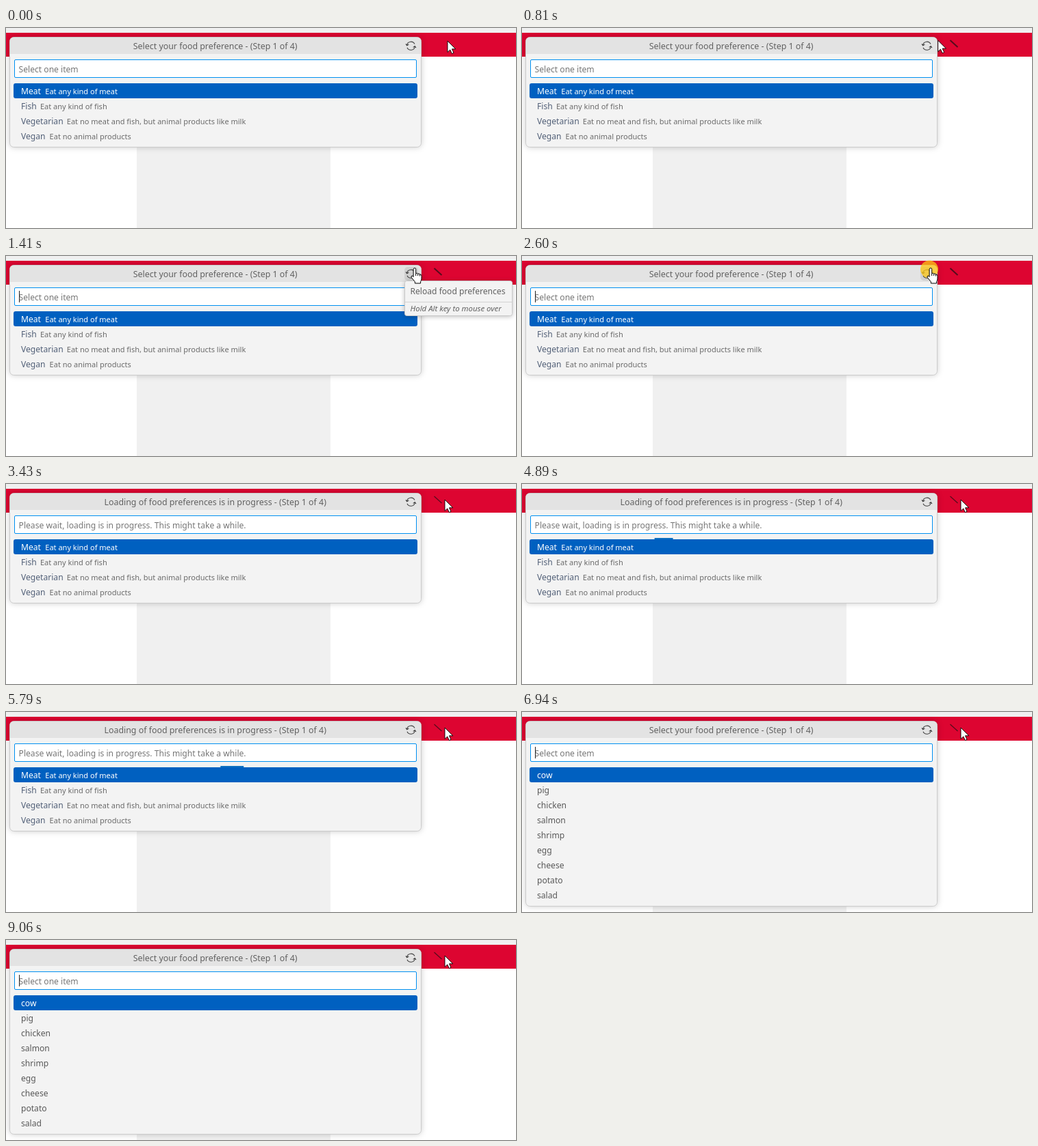
These frames come from a looping animation (745 by 293 pixels, 9130 ms). An HTML page:

```html
<!DOCTYPE html>
<html lang="en">
<head>
<meta charset="utf-8">
<title>Quick pick</title>
<style>
html, body { margin: 0; width: 100%; height: 100%; overflow: hidden; background: #fff; }
svg { display: block; font: 12.1px "Noto Sans", "Open Sans", sans-serif; fill: #616161; }
#panel { filter: drop-shadow(0 0 4px rgba(0, 0, 0, .2)); }
#tip { filter: drop-shadow(0 1px 3px rgba(0, 0, 0, .25)); }
.desc { font-size: 11px; fill: #6a6a6a; }
.first, .first .desc { fill: #fff; }
.cursor { fill: #fff; stroke: #000; stroke-linejoin: round; }
</style>
</head>
<body>
<svg width="745" height="293" viewBox="0 0 745 293">
  <rect width="745" height="7" fill="#f0f0f0"/>
  <rect y="7" width="745" height="35" fill="#dd0531"/>
  <rect x="191" y="141" width="283" height="283" fill="#f0f0f0"/>
  <path id="streak" d="M625.5 18L636.5 28" stroke="#560c1c"/>

  <rect id="panel" x="5.5" y="13.5" width="601" rx="6" fill="#f3f3f3" stroke="#cbcbcb"/>
  <path d="M6 38V19q0-5 5-5H601q5 0 5 5V38z" fill="#e3e3e3"/>
  <text id="title" x="305.7" y="31" text-anchor="middle" font-size="12.38"></text>
  <rect id="hover" x="582" y="16" width="20" height="20" rx="5" fill="#b8b8b8" fill-opacity=".45"/>
  <g fill="none" stroke="#424242" stroke-width="1.1">
    <path id="turn" d="M585.6 25.4A6 6 0 0 1 597 23.6M584 23.4L585.7 25.8L588.3 24"/>
    <use href="#turn" transform="rotate(180 591.5 26.2)"/>
  </g>
  <rect x="12.5" y="46.5" width="587" height="26" rx="1.5" fill="#fff" stroke="#0090f1"/>
  <text id="hint" x="18.6" y="65" fill="#767676"></text>
  <rect id="caret" x="19" y="51" width="1" height="17" fill="#222"/>
  <rect id="bar" y="79" height="2" fill="#0e70c0"/>
  <rect x="11" y="81" width="590" height="22" rx="3" fill="#0060c0"/>
  <g id="before"></g>
  <g id="after"></g>

  <g id="tip">
    <rect x="582.5" y="36.5" width="157" height="51" rx="3" fill="#f3f3f3" stroke="#c8c8c8"/>
    <path d="M583 67.5H739" stroke="#d2d2d2"/>
    <text x="590.5" y="56">Reload food preferences</text>
    <text x="590.5" y="81" font-size="11.4" font-style="italic">Hold Alt key to mouse over</text>
  </g>
  <circle id="click" cx="595" cy="19.5" r="13" fill="#ffc814" fill-opacity=".75"/>
  <path id="arrow" class="cursor" stroke-width=".9" d="M0 0V16.4L3.8 12.9L6.4 18.6L9 17.4L6.5 11.8H11.8z"/>
  <g id="hand" class="cursor">
    <path d="M-1.9 1.5a1.8 1.8 0 0 1 3.6 0V7.5q1.5-1 3 .6q1.5-.8 2.8.6q2.5 0 2.5 2.6V15q0 2.4-1.4 4.5V22H.4V19.8L-4.6 13.6q-1.2-2 .6-2.6q1 0 2.1 1.6z"/>
    <path fill="none" d="M1.7 7.5V11M4.7 8.2V11M7.5 8.8V11.5"/>
  </g>
</svg>
<script>
const LOOP = 9130, STEP = 70;
const MOVE = 390, CLICK = 2600, BUSY = 2730, BACK = 3080, BAR = 3560, DONE = 5860;
const $ = id => document.getElementById(id);
const show = (id, on) => $(id).setAttribute("visibility", on ? "visible" : "hidden");
const set = (id, attrs) => Object.entries(attrs).forEach(([k, v]) => $(id).setAttribute(k, v));
const between = (t, a, b) => t >= a && t < b;
const setText = (id, s) => { if ($(id).textContent !== s) $(id).textContent = s; };

function fillList(id, rows, color) {
  $(id).innerHTML = rows.map(([label, desc = "", x = 0], i) => {
    const y = 97 + 22 * i;
    return `<g ${i ? `fill="${color}"` : 'class="first"'}><text x="22" y="${y}">${label}</text>` +
      `<text class="desc" x="${x}" y="${y}">${desc}</text></g>`;
  }).join("");
}
fillList("before", [
  ["Meat", "Eat any kind of meat", 57.3],
  ["Fish", "Eat any kind of fish", 50],
  ["Vegetarian", "Eat no meat and fish, but animal products like milk", 88.8],
  ["Vegan", "Eat no animal products", 63.6]
], "#515f77");
fillList("after", "cow pig chicken salmon shrimp egg cheese potato salad".split(" ").map(s => [s]), "#585858");

// Share of a pointer move completed, in whole screen updates
const progress = (t, start, steps) =>
  Math.max(0, Math.min(1, (Math.floor((t - start) / STEP) + 1) / steps));

function caretOn(t) {
  if (t >= DONE) return Math.floor((t - 5880) / 530) % 2 <= 0;
  return between(t, 130, 670) || between(t, 1210, 1740) || between(t, 2270, BUSY);
}

function drawPointer(t) {
  const there = progress(t, MOVE, 9), back = progress(t, BACK, 6);
  const x = 645 - 48 * there + 44 * back, y = 19 - there + 5 * back;
  const over = x < 602;
  for (const id of ["arrow", "hand"]) set(id, { transform: `translate(${x} ${y})` });
  show("arrow", !over);
  show("hand", over);
  show("hover", over);
}

function drawBar(t) {
  show("bar", between(t, BAR, DONE));
  const now = BAR + Math.floor((t - BAR) / STEP) * STEP;
  const u = Math.max(0, (now - 3604) / 2000);
  const unit = 11.8, width = unit * (1 + 2 * Math.min(u, 2 - u));
  const center = 11.5 + unit * (.5 + (u < 1 ? 25 * u : 25 + 24 * (u - 1)));
  set("bar", { x: center - width / 2, width: Math.max(0, width) });
}

function draw(t) {
  const busy = between(t, BUSY, DONE), done = t >= DONE;
  setText("title", (busy ? "Loading of food preferences is in progress" : "Select your food preference") + " - (Step 1 of 4)");
  setText("hint", busy ? "Please wait, loading is in progress. This might take a while." : "Select one item");
  set("panel", { height: done ? 271 : 161 });
  show("before", !done);
  show("after", done);
  show("caret", caretOn(t));
  show("streak", t >= 600);
  set("streak", { "stroke-width": t < BACK ? 2 : 1.2 });
  show("click", between(t, CLICK, BUSY));
  set("tip", { opacity: between(t, 1340, CLICK) ? (t < 1410 ? .5 : 1) : 0 });
  drawPointer(t);
  drawBar(t);
}

const start = performance.now();
function frame() {
  draw((performance.now() - start) % LOOP);
  requestAnimationFrame(frame);
}
frame();
</script>
</body>
</html>
```
